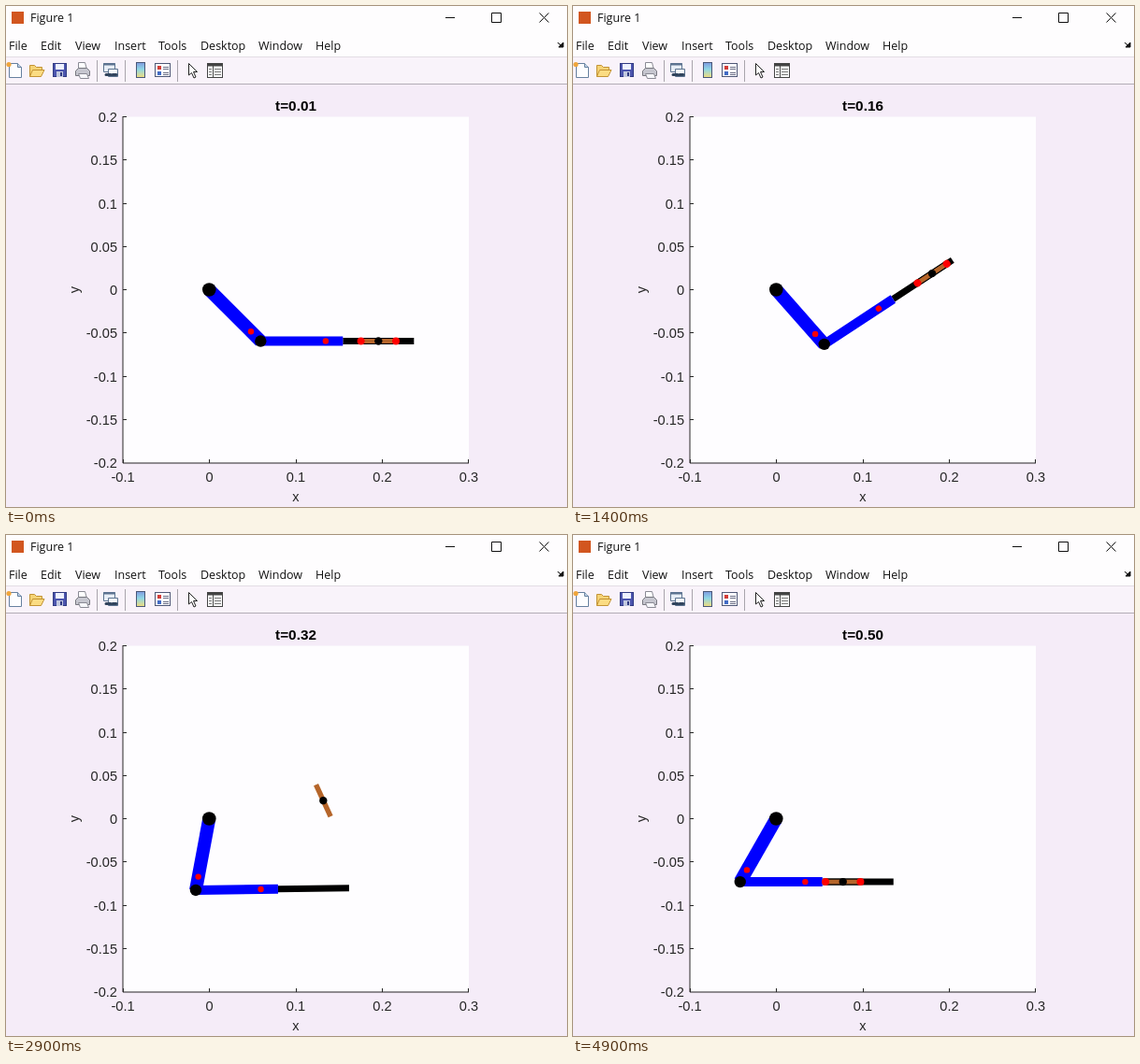
Write an HTML page that moves like this. It is 600x536 px and loops after 5 s.

```html
<!DOCTYPE html>
<html lang="en">
<head>
<meta charset="utf-8">
<title>Figure 1</title>
<style>
  html, body { margin: 0; width: 100%; height: 100%; overflow: hidden; background: #f5ecf8; }
  svg { display: block; width: 600px; height: 536px; }
  .ui text { font: 12.5px "Open Sans", "Noto Sans", sans-serif; fill: #111; }
  .plot text { font: 14.6px "Liberation Sans", Arial, sans-serif; fill: #262626; }
  .plot #title { font-size: 15.3px; font-weight: bold; fill: #000; }
</style>
</head>
<body>
<svg viewBox="0 0 600 536">
  <rect width="600" height="536" fill="#f5ecf8"/>
  <g class="ui">
    <rect width="600" height="55" fill="#fefdfe"/>
    <rect y="55" width="600" height="28" fill="#f9f3fa"/>
    <path d="M0 54.5H600" stroke="#e3dde5"/>
    <path d="M0 83.5H600" stroke="#b3adb6"/>
    <rect x="6" y="6" width="13" height="13" fill="#d2561f"/>
    <text x="26" y="17">Figure 1</text>
    <path d="M470 12.5H480M519.5 7.5H529.5V17.5H519.5ZM570.5 7.5L580.5 17.5M580.5 7.5L570.5 17.5" fill="none" stroke="#111"/>
    <path d="M590 39Q592 42 595 42.5M596 39V44H591Z" fill="#111" stroke="#111"/>
    <g id="menu"></g>
    <path d="M97.5 58V81M127.5 58V81M183.5 58V81" stroke="#a9a5ac"/>
    <!-- new, open, save, print -->
    <path d="M3.5 61.5H12.5L16.5 65.5V76.5H3.5Z" fill="#fdfdff" stroke="#66809f"/>
    <path d="M12.5 61.5V65.5H16.5" fill="#c4d5e8" stroke="#66809f"/>
    <circle cx="3" cy="62.5" r="2.6" fill="#efa53a"/>
    <path d="M25.5 75.5V63.5H30.5L32.5 65.5H38.5V68" fill="#f5d376" stroke="#c39335"/>
    <path d="M25.5 75.5L28.5 68.5H41L37.5 75.5Z" fill="#fbdc83" stroke="#c39335"/>
    <rect x="50.5" y="61.5" width="14" height="14" fill="#4c55ae" stroke="#303982"/>
    <rect x="53" y="62" width="9" height="6" fill="#eef1ff"/>
    <rect x="54" y="70" width="7" height="6" fill="#c2c8df"/>
    <rect x="58" y="71" width="2" height="4" fill="#303982"/>
    <path d="M77.5 68V60.5H84.5L86.5 68" fill="#fff" stroke="#8a8a94"/>
    <path d="M74.5 69.5L77.5 66.5H86.5L89.5 69.5V74.5H74.5Z" fill="#c6c6cf" stroke="#77777f"/>
    <path d="M77.5 72.5H86.5L88.5 77.5H79.5Z" fill="#f7f7fb" stroke="#8a8a94"/>
    <!-- link, colour bar, legend -->
    <path d="M104.5 61.5H116.5V70.5H104.5Z" fill="#e8eef7" stroke="#5d7390"/>
    <path d="M104 62.5H117" stroke="#5d7390" stroke-width="2"/>
    <path d="M109.5 67.5H119.5V75.5H109.5Z" fill="#f5f8fc" stroke="#5d7390"/>
    <path d="M107 73.5H112M114 73.5H118" stroke="#31445d" stroke-width="3" stroke-linecap="round"/>
    <linearGradient id="bar" x2="0" y2="1">
      <stop stop-color="#7f9be0"/><stop offset=".45" stop-color="#8fd7e5"/><stop offset="1" stop-color="#f1dd7c"/>
    </linearGradient>
    <rect x="139.5" y="60.5" width="9" height="16" fill="url(#bar)" stroke="#4a5878"/>
    <rect x="159.5" y="61.5" width="16" height="14" fill="#fafaff" stroke="#4f5876"/>
    <rect x="162" y="64" width="4" height="4" fill="#d33c36"/>
    <rect x="162" y="70" width="4" height="4" fill="#426cc5"/>
    <path d="M168 65.5H174M168 67.5H174M168 71.5H174M168 73.5H174" stroke="#6d7085"/>
    <!-- pointer, inspector -->
    <path d="M195.5 61.5V74L198.5 71.5L201 77L203 76L200.5 70.5H204.5Z" fill="#fff" stroke="#222"/>
    <rect x="215.5" y="61.5" width="16" height="15" fill="#fff" stroke="#444"/>
    <path d="M215 63H232" stroke="#444" stroke-width="3"/>
    <path d="M221.5 64V76" stroke="#444"/>
    <path d="M217 67.5H220M217 70.5H220M217 73.5H220M223 67.5H230M223 70.5H230M223 73.5H230" stroke="#777"/>
  </g>
  <g class="plot">
    <rect x="125" y="118.5" width="370" height="370" fill="#fefdff"/>
    <path id="axes" fill="none" stroke="#262626"/>
    <g id="labels"></g>
    <text x="310" y="530" text-anchor="middle">x</text>
    <text transform="translate(78 303.5) rotate(-90)" text-anchor="middle">y</text>
    <text id="title" x="310" y="111.5" text-anchor="middle"></text>
  </g>
  <g id="upper">
    <path d="M0 0H77.8" stroke="#00f" stroke-width="14"/>
  </g>
  <g id="fore">
    <path d="M88 0H164" stroke="#000" stroke-width="7"/>
    <path d="M0 0H88" stroke="#00f" stroke-width="10"/>
    <circle cx="69.6" r="3.2" fill="#f00"/>
  </g>
  <circle cx="217.3" cy="303.5" r="7.3"/>
  <circle id="elbow" r="6.2"/>
  <circle id="mass" r="3.2" fill="#f00"/>
  <g id="stick">
    <path d="M-18.7 0H18.7" stroke="#b5652a" stroke-width="5.5"/>
    <g id="grip" fill="#f00">
      <path d="M-18.7 -3H18.7M-18.7 3H18.7" stroke="#000"/>
      <circle cx="-18.7" r="4"/><circle cx="18.7" r="4"/>
    </g>
    <circle r="4.2"/>
  </g>
</svg>
<script>
const el = id => document.getElementById(id);
const SCALE = 925, X0 = 217.3, Y0 = 303.5, UPPER = 77.8;
const LOOP = 5000, STEP = 100, RELEASE = 16, CATCH = 41;

// [time in hundredths of a second, angle in degrees]
const shoulder = [[1, -45], [5, -43.7], [8, -42.6], [10, -42.4], [12, -43], [14, -44.8], [16, -48.6],
  [17, -56], [18, -68], [19, -81], [20, -89], [21, -90.5], [26, -94.1], [33, -101.7],
  [37, -105.2], [44, -113.8], [50, -119.7]];
const forearm = [[1, 0], [5, 2.2], [8, 6.7], [10, 11.1], [12, 17.5], [14, 25.8], [16, 33.3],
  [17, 33.5], [18, 28], [19, 17], [20, 8], [21, 4.8], [26, 3.1], [31, 1], [37, -0.3], [44, -0.1], [50, 0]];
const spin = [[16, 33.3], [26, 80.5], [37, 143], [41, 166]];
// distance of the stick from the elbow while it slides in the gripper
const slideOut = [[1, 126], [10, 124.6], [13, 128], [16, 138]];
const slideIn = [[41, 121.5], [44, 118.5], [50, 110]];

function at(keys, n) {
  let i = 1;
  while (i < keys.length - 1 && keys[i][0] < n) i++;
  const [a, u] = keys[i - 1], [b, v] = keys[i];
  return u + (v - u) * (n - a) / (b - a);
}

function polar(x, y, deg, r) {
  const a = deg * Math.PI / 180;
  return [x + r * Math.cos(a), y - r * Math.sin(a)];
}

function place(id, [x, y], deg = 0) {
  el(id).setAttribute("transform", `translate(${x.toFixed(2)} ${y.toFixed(2)}) rotate(${(-deg).toFixed(2)})`);
}

// free flight under gravity
function flight(n) {
  const t = (n - 26) / 100;
  const x = 0.1508 - 0.3145 * t, y = 0.0492 - 0.177 * t - 4.905 * t * t;
  return [X0 + x * SCALE, Y0 - y * SCALE];
}

function addText(parent, str, x, y, anchor) {
  const t = document.createElementNS("http://www.w3.org/2000/svg", "text");
  t.setAttribute("x", x);
  t.setAttribute("y", y);
  t.setAttribute("text-anchor", anchor);
  t.textContent = str;
  el(parent).append(t);
}

function build() {
  const menu = { File: 3, Edit: 37, View: 74, Insert: 116, Tools: 163, Desktop: 208, Window: 270, Help: 331 };
  for (const name in menu) addText("menu", name, menu[name], 47, "start");
  let d = "M125 118V489H495";
  for (let i = 0; i <= 8; i++) {
    const y = 118.5 + i * 46.25;
    if (i < 8) d += `M125 ${Math.floor(y) + 0.5}h4`;
    addText("labels", String((20 - 5 * i) / 100), 119, y + 5.5, "end");
  }
  for (let i = 0; i <= 4; i++) {
    const x = 125 + i * 92.5;
    d += `M${Math.floor(x) + (i < 4 ? 0.5 : -0.5)} 489v-4`;
    addText("labels", String((i - 1) / 10), x, 509, "middle");
  }
  el("axes").setAttribute("d", d);
}

function draw(ms) {
  const step = Math.floor((ms % LOOP) / STEP);
  const n = Math.min(50, Math.round(1.27 + 1.054 * step));
  const a = at(shoulder, n), b = at(forearm, n);
  const elbow = polar(X0, Y0, a, UPPER);
  const held = n <= RELEASE || n >= CATCH;
  const reach = at(n <= RELEASE ? slideOut : slideIn, n);

  el("title").textContent = "t=" + (n / 100).toFixed(2);
  place("upper", [X0, Y0], a);
  place("fore", elbow, b);
  place("elbow", elbow);
  place("mass", polar(X0, Y0, a, 63.2));
  if (held) place("stick", polar(...elbow, b, reach), b);
  else place("stick", flight(n), at(spin, n));
  el("grip").style.display = held ? "" : "none";
}

build();
const start = performance.now();
function tick() {
  draw(performance.now() - start);
  requestAnimationFrame(tick);
}
tick();
</script>
</body>
</html>
```
